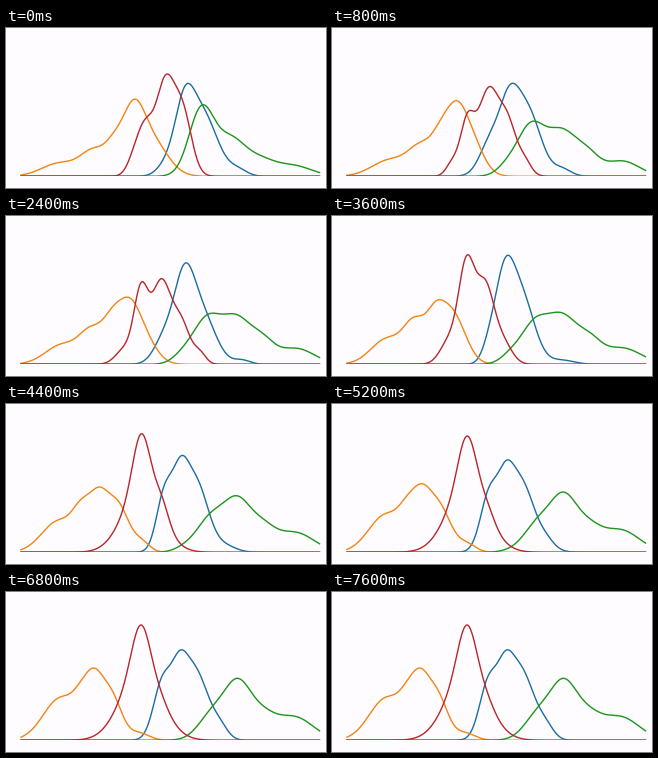
These frames come from a looping animation (320x160 px, 8000 ms). A matplotlib script:

```python
import numpy as np
import matplotlib.pyplot as plt
from matplotlib.animation import FuncAnimation

WIDTH, HEIGHT, DPI = 320, 160, 100
FLOOR = 148          # lower edge of the plot, where the lines are cut off
STEPS, STEP_MS = 20, 400
X = np.arange(15, 313.6, 0.5)


def density(*bumps):
    """Sum of Gaussian bumps, each given as centre, width, height."""
    return sum(h * np.exp(-0.5 * ((X - c) / w) ** 2) for c, w, h in bumps)


def blend(a, b, mix):
    return a + (b - a) * mix


# Each curve maps a step to the density it has settled into by then.
blue = {
    0: density((160, 9, 10), (178, 9.5, 56), (196, 15, 62), (232, 9, 6)),
    2: density((158, 10.5, 32), (177, 10, 62), (196, 13, 62), (230, 9, 7)),
    6: density((159, 10.5, 26), (178, 10, 70), (195, 14, 50), (236, 8, 4)),
    9: density((157, 7, 14), (172, 9.5, 73), (189, 13, 67), (230, 12, 4)),
    11: density((158.5, 8, 56), (174, 8, 58), (190, 12, 68), (219, 11, 6)),
    15: density((156.5, 9, 56), (173, 8, 46), (189, 13, 68), (214, 8, 11)),
}

orange = {
    0: density((54, 18, 13), (88, 13, 24), (108, 9, 22), (127, 11, 57), (146, 15.5, 34)),
    2: density((58, 18, 16), (90, 13, 28), (109, 9, 29), (124, 10, 51), (139, 12, 34)),
    9: density((55, 16, 25), (83, 11, 38), (103, 9, 33), (120, 13, 50)),
    11: density((53, 17, 31), (75.5, 9, 30), (92.5, 9.5, 48), (112, 11, 45), (136, 8, 9)),
    16: density((55, 17.5, 42), (74, 8, 16), (88, 9.5, 53), (106, 10, 40), (133, 10, 7)),
}
orange[6] = blend(orange[2], orange[9], 0.37)

green = {
    0: density((195.5, 12.5, 66), (224, 14, 33), (252, 16, 16), (288, 18, 10)),
    2: density((174, 10, 7), (199, 14, 50), (230, 14, 41), (255, 12, 20), (290, 17, 15)),
    9: density((178, 10, 7), (203, 14, 40), (231, 14, 43), (257, 12, 21), (290, 19, 16)),
    15: density((207, 14, 26), (232, 13, 52), (256, 13, 20), (288, 19, 23)),
}
green[6] = blend(green[2], green[9], 0.55)

red = {
    0: density((128, 7, 14), (139.5, 8, 45), (159, 9, 88), (176.5, 9, 62)),
    2: density((120, 6, 12), (135, 7, 50), (157, 11, 86), (176.5, 8, 42), (192, 7, 15)),
    6: density((119, 9, 15), (135, 7, 69), (155, 9.5, 80), (175, 9, 40), (194, 6, 10)),
    9: density((117, 9, 22), (134.5, 8, 95), (153, 9, 75), (171, 9, 20)),
    11: density((135.5, 8.5, 55), (136, 19, 62), (156, 7, 17)),
    15: density((135, 9, 45), (135, 20, 69), (156, 7, 3)),
}


def settle(shapes, step):
    """Ease out from the last reached shape to the next one."""
    start = max(k for k in shapes if k <= step)
    end = min((k for k in shapes if k > step), default=None)
    if end is None:
        return shapes[start]
    t = (step - start) / (end - start)
    return blend(shapes[start], shapes[end], 1 - (1 - t) ** 1.7)


fig = plt.figure(figsize=(WIDTH / DPI, HEIGHT / DPI), dpi=DPI, facecolor="#fefcfe")
ax = fig.add_axes([0, 1 - FLOOR / HEIGHT, 1, FLOOR / HEIGHT])
ax.set(xlim=(0, WIDTH), ylim=(FLOOR, 0))
ax.axis("off")

curves = [(blue, "#1c6ca4"), (orange, "#f28414"), (green, "#1c941c"), (red, "#b8262a")]
lines = [ax.plot(X, X, color=color, lw=1)[0] for _, color in curves]


def draw(step):
    for line, (shapes, _) in zip(lines, curves):
        line.set_ydata(FLOOR + 0.25 - 1.011 * settle(shapes, step))
    return lines


anim = FuncAnimation(fig, draw, frames=STEPS, interval=STEP_MS,
                     repeat=True, repeat_delay=0)
plt.show()
```
